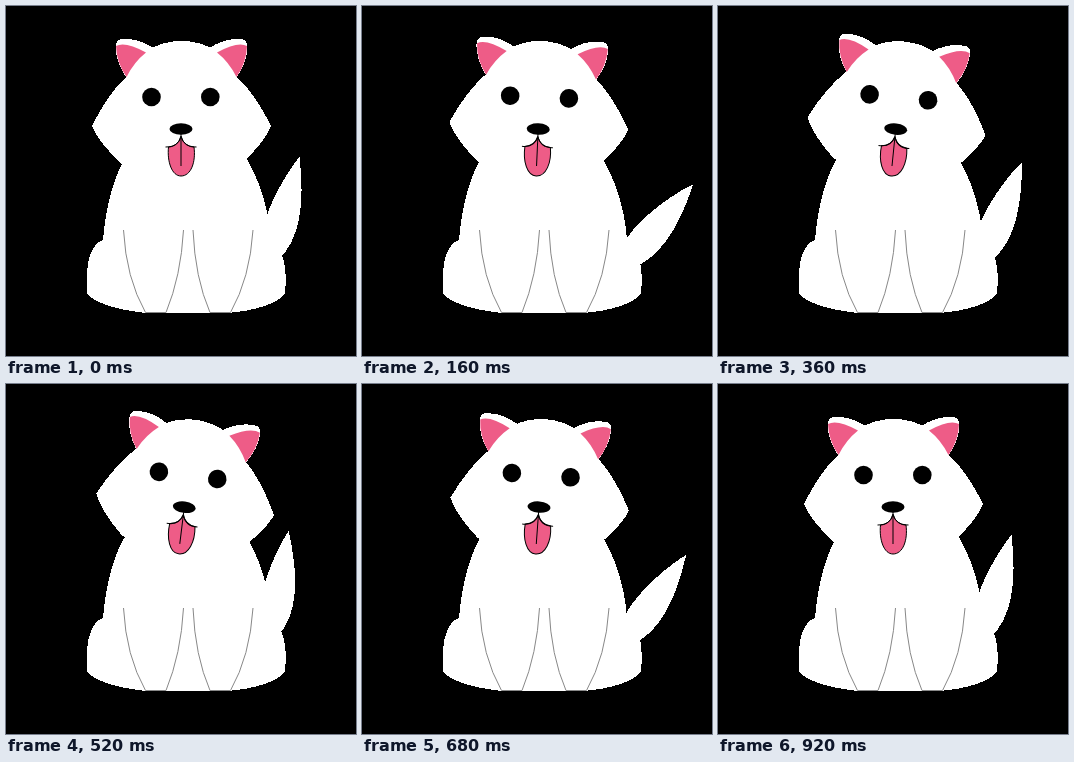
An HTML page for the animation above (0.96 s loop, 350 by 350 pixels).

```html
<!DOCTYPE html>
<html lang="en">
<head>
<meta charset="utf-8">
<title>Happy dog</title>
<style>
  html, body { margin: 0; width: 100%; height: 100%; overflow: hidden; background: #000; }
  svg { display: block; width: 350px; height: 350px; }
  .fur { shape-rendering: crispEdges; }
</style>
</head>
<body>
<svg viewBox="0 0 350 350" fill="#fff">
  <defs>
    <g id="half">
      <path class="fur" d="M181 35H175.500C163 35 154 38 147 41.500Q130 31 114 33.500Q109.500 34.500 109.500 42Q110.500 57 120 71Q102 88 86 120Q93 137 116.500 158.500L150 172H181Z"/>
      <path fill="#ee5c87" d="M110 40Q119 35 140 46.500Q128 56 120.500 71Q110.500 57 110 40Z"/>
    </g>
  </defs>
  <path id="tail" class="fur" d="M293.500 151C283 163 260 200 256 228L251 256L272 254C294 234 299 198 293.500 151Z"/>
  <path class="fur" d="M122 148Q102 177 97 234C87 237 81 252 81 270V288Q95 302 140 307H222Q265 303 279 288Q283 247 265 233Q261 185 237 146Z"/>
  <path fill="none" stroke="#888" d="M117.500 224Q120 272 139.500 306.500H160Q175 270 177.500 224M187 224Q189 272 204 306.500H224.500Q244 272 247 224"/>
  <g id="head">
    <use href="#half"/>
    <use href="#half" transform="matrix(-1 0 0 1 351 0)"/>
    <g fill="#000">
      <circle cx="145.500" cy="91" r="9.300"/>
      <circle cx="204.300" cy="91" r="9.300"/>
      <ellipse cx="175" cy="123" rx="11.500" ry="5.700"/>
    </g>
    <g fill="none" stroke="#000">
      <path fill="#ee5c87" d="M162.500 141C161 156 166 170 175 170C185 170 190 156 188 141Q178 140 175 131Q172 140 162.500 141Z"/>
      <path d="M159.500 141Q172 142 175 130Q178 142 190.500 141M175 128V160"/>
    </g>
  </g>
</svg>
<script>
  const STEP = 40, STEPS = 24;
  // Keys are [step, degrees], joined linearly.
  const parts = [
    { id: 'head', pivot: '175 150', keys: [[0, 0], [12, 7.7], [23, 0]] },
    { id: 'tail', pivot: '251 250', keys: [[0, 0], [5, 31.2], [12, -12.6], [18, 26], [23, 0]] }
  ];

  function angleAt(keys, step) {
    const i = keys.findIndex(([s]) => s >= step);
    if (i < 1) return keys[0][1];
    const [s0, a0] = keys[i - 1], [s1, a1] = keys[i];
    return a0 + (a1 - a0) * (step - s0) / (s1 - s0);
  }

  function draw() {
    const step = Math.floor(performance.now() / STEP) % STEPS;
    for (const { id, pivot, keys } of parts) {
      document.getElementById(id).setAttribute('transform', `rotate(${angleAt(keys, step)} ${pivot})`);
    }
    requestAnimationFrame(draw);
  }
  draw();
</script>
</body>
</html>
```
